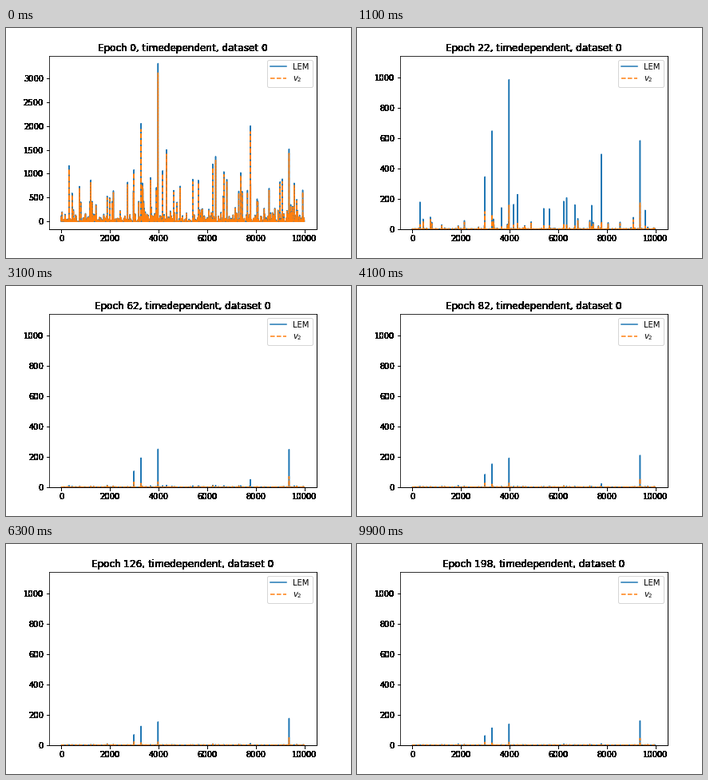
Animation, 432 px wide and 288 px high, one loop 10000 ms. Source, as a matplotlib script:

```python
import numpy as np
import matplotlib.pyplot as plt
from matplotlib.animation import FuncAnimation

plt.rcParams.update({"font.family": "DejaVu Sans", "font.size": 10})

N = 10000
FRAMES = 100
HOLD = 20  # last epoch with an automatic y range

# Lasting spikes: position, start height, final height, v2 share
LASTING = [
    (2990, 1080, 61, 0.32),
    (3280, 2050, 110, 0.13),
    (3980, 3310, 135, 0.14),
    (7780, 2000, 10, 0.05),
    (9370, 1515, 156, 0.28),
]
# Tall spikes that fade away: position, start height
FADING = [
    (320, 1165), (3670, 915), (4170, 1060), (4330, 1500), (5410, 880),
    (5640, 860), (6230, 1200), (6350, 1360), (6690, 1040), (7380, 1020),
    (9580, 800),
]

rng = np.random.default_rng(4)


def group(x, start, floor, share, tau):
    return np.stack(np.broadcast_arrays(x, start, floor, share, tau))


def scatter(count, start, floor, share, tau):
    """Spikes at random places with a random residue."""
    residue = floor * np.exp(0.7 * rng.standard_normal(count))
    return group(rng.integers(0, N, count), start, residue, share, tau)


noise = np.minimum(55 * np.exp(0.9 * rng.standard_normal(420)), 420)
SPIKES = np.hstack([
    scatter(420, noise, 0.8, 0.9, 4),
    scatter(28, rng.uniform(400, 900, 28), 2, 0.8, rng.uniform(4, 10, 28)),
    group(*np.transpose(FADING), 4, 0.15, 11.5),
    group(*np.transpose(LASTING), 15.4),
])
X = SPIKES[0].astype(int)
START, FLOOR, SHARE, TAU = SPIKES[1:]


def heights(epoch):
    """Spike heights of both curves: a fast and a slow decay to a floor."""
    slow = np.minimum(1.6 * FLOOR, START - FLOOR)
    fast = START - FLOOR - slow
    lem = FLOOR + slow * np.exp(-epoch / 50) + fast * np.exp(-epoch / TAU)
    v2 = lem * (SHARE + (0.94 - SHARE) * np.exp(-epoch / 6))
    return lem, v2


def curve(h):
    y = np.zeros(N)
    np.maximum.at(y, X, h)
    return y


def harden(img, dpi):
    """Turn soft edges solid black."""
    out = np.zeros_like(img)
    out[..., 3] = img[..., 3] > 0.04
    return out, 0, 0


fig, ax = plt.subplots(figsize=(6, 4), dpi=72)
fig.subplots_adjust(left=0.125, right=0.9, bottom=0.125, top=0.88)
lem_line, = ax.plot(np.zeros(N), label="LEM")
v2_line, = ax.plot(np.zeros(N), "--", label="$v_2$")
ax.legend(loc="upper right")
title = ax.set_title("")
for part in (ax.xaxis, ax.yaxis, title, ax.spines["right"],
             ax.spines["bottom"]):
    part.set_agg_filter(harden)


def update(i):
    epoch = 2 * i
    lem, v2 = heights(epoch)
    lem_line.set_ydata(curve(lem))
    v2_line.set_ydata(curve(v2))
    peak = heights(min(epoch, HOLD))[0].max()
    ax.set_ylim(-0.05 * peak if epoch <= HOLD else 0, 1.05 * peak)
    title.set_text(f"Epoch {epoch}, timedependent, dataset 0")
    return lem_line, v2_line, title


anim = FuncAnimation(fig, update, frames=FRAMES, interval=100,
                     repeat=True, repeat_delay=0, blit=False)
plt.show()
```
